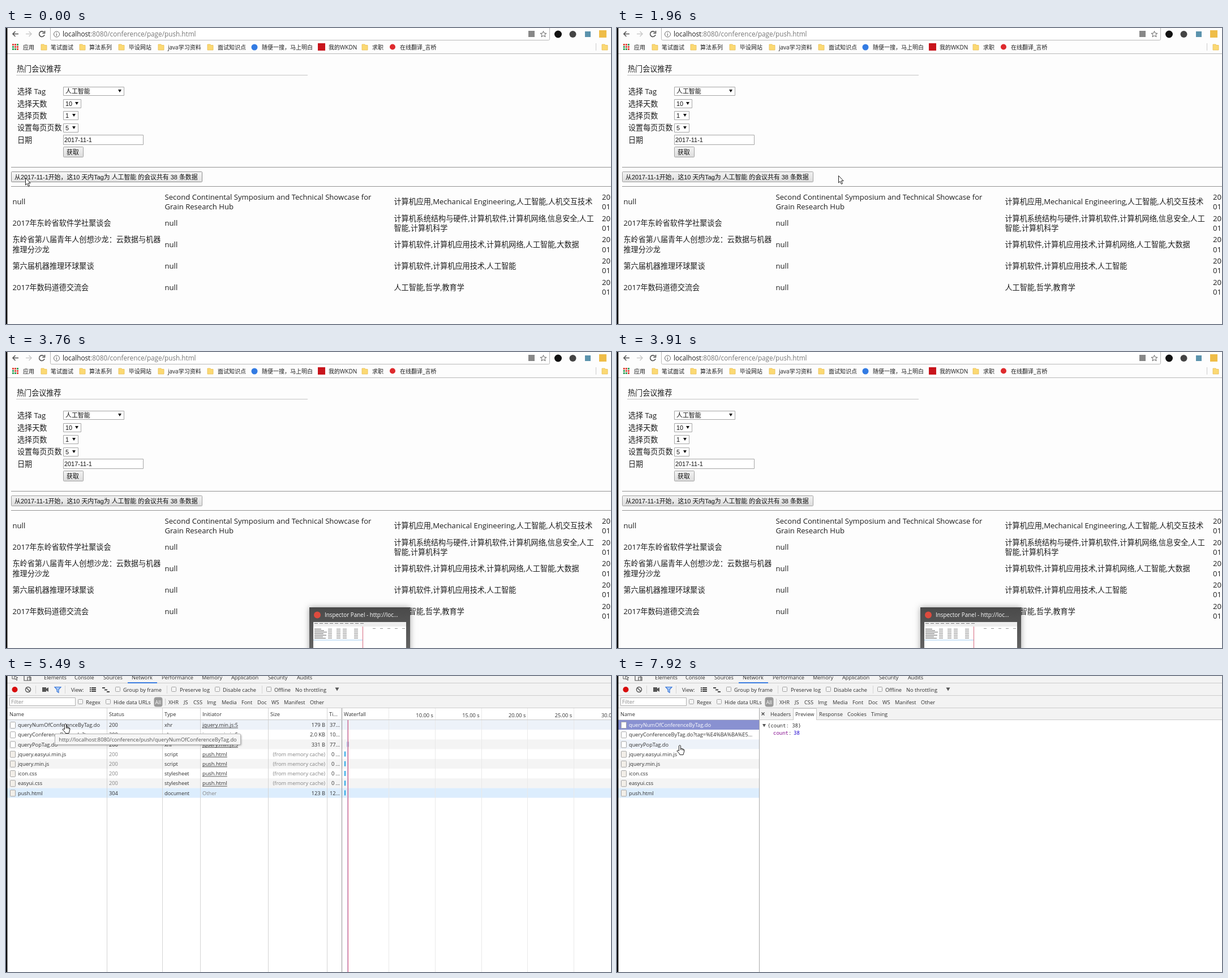
Animation of 1069 by 524 pixels, one loop 8000 ms. Source, as an HTML page with a canvas:

```html
<!DOCTYPE html>
<html lang="zh-CN">
<head>
<meta charset="utf-8">
<title>Conference page and network panel</title>
<style>
html, body { margin: 0; width: 100%; height: 100%; overflow: hidden; background: #fff; }
canvas { display: block; }
</style>
</head>
<body>
<canvas id="stage" width="1069" height="524"></canvas>
<script>
const W = 1069, H = 524, LOOP = 8000;
const g = document.getElementById('stage').getContext('2d');
const UI = '"Open Sans", "Noto Sans CJK SC", "Noto Sans CJK JP", sans-serif';
const FORM = '"Liberation Sans", "Noto Sans CJK SC", "Noto Sans CJK JP", sans-serif';
const MONO = '"Noto Sans Mono", monospace';
const SMALL = 9.25;
const PUSH_URL = 'http://localhost:8080/conference/push/';
const TAG_QUERY = '%E4%BA%BA%E5%B7%A5%E6%99%BA%E8%83%BD';

// ---- drawing helpers ----
function text(s, x, y, size = 13.1, color = '#1c1c1c', family = UI, align = 'left') {
  g.font = `${size}px ${family}`;
  g.fillStyle = color;
  g.textAlign = align;
  g.fillText(s, x, y);
}
const small = (s, x, y, color = '#303030', align) => text(s, x, y, SMALL, color, UI, align);

function rect(x, y, w, h, fill) {
  g.fillStyle = fill;
  g.fillRect(x, y, w, h);
}
function box(x, y, w, h, fill, stroke, radius = 0) {
  g.beginPath();
  g.roundRect(x + .5, y + .5, w - 1, h - 1, radius);
  paint(fill, stroke);
}
function circle(x, y, r, fill, stroke, width) {
  g.beginPath();
  g.arc(x, y, r, 0, 7);
  paint(fill, stroke, width);
}
function shape(d, x, y, fill, stroke, width) {
  g.save();
  g.translate(x, y);
  const path = new Path2D(d);
  if (fill) { g.fillStyle = fill; g.fill(path); }
  if (stroke) { g.strokeStyle = stroke; g.lineWidth = width || 1; g.stroke(path); }
  g.restore();
}
function paint(fill, stroke, width = 1) {
  if (fill) { g.fillStyle = fill; g.fill(); }
  if (stroke) { g.strokeStyle = stroke; g.lineWidth = width; g.stroke(); }
}
function gradient(y, h, top, bottom) {
  const fill = g.createLinearGradient(0, y, 0, y + h);
  fill.addColorStop(0, top);
  fill.addColorStop(1, bottom);
  return fill;
}

// ---- web page ----
function folder(x) {
  shape('M0 1H5L6 2.5H10V11H0Z', x, 28, '#fbd973', '#e9bd51', .8);
}
function select(x, y, w, h, value) {
  box(x, y, w, h, '#fff', '#a6a6a6');
  text(value, x + 4, y + h / 2 + 4, 10.9, '#111', FORM);
  shape('M0 0H6L3 5Z', x + w - 11, y + h / 2 - 3, '#111');
}
function button(x, y, w, h, label, hover) {
  box(x, y, w, h, gradient(y, h, hover ? '#f8f8f8' : '#f3f3f3', hover ? '#e2e2e2' : '#dcdcdc'),
    hover ? '#8c8c8c' : '#a0a0a0', 1);
  text(label, x + 6, y + h / 2 + 4, 10.9, '#111', FORM);
}
function lines(list, x, center) {
  list.forEach((s, i) => text(s, x, center + 4.8 + (i - (list.length - 1) / 2) * 17.2));
}

const bookmarks = [['笔试面试', 79], ['算法系列', 147], ['毕设网站', 217], ['java学习资料', 286], ['面试知识点', 374],
  ['随便一搜，马上明白', 452], ['我的WKDN', 570], ['求职', 647], ['在线翻译_言桥', 696]];
const conferences = [
  [['null'], ['Second Continental Symposium and Technical Showcase for', 'Grain Research Hub'],
    ['计算机应用,Mechanical Engineering,人工智能,人机交互技术']],
  [['2017年东岭省软件学社聚谈会'], ['null'], ['计算机系统结构与硬件,计算机软件,计算机网络,信息安全,人工', '智能,计算机科学']],
  [['东岭省第八届青年人创想沙龙：云数据与机器', '推理分沙龙'], ['null'], ['计算机软件,计算机应用技术,计算机网络,人工智能,大数据']],
  [['第六届机器推理环球聚谈'], ['null'], ['计算机软件,计算机应用技术,人工智能']],
  [['2017年数码道德交流会'], ['null'], ['人工智能,哲学,教育学']]
];

function drawBrowserBar() {
  shape('M11 5.5H1M5.5 1L1 5.5L5.5 10', 11, 5, null, '#555', 1.6);
  shape('M0 5.5H10M5.5 1L10 5.5L5.5 10', 35, 5, null, '#ccc', 1.6);
  shape('M9 2.5A4.8 4.8 0 1 0 10 7M10.5 0V4.2H6.3', 58, 5, null, '#555', 1.6);
  box(78, -4, 883, 26, '#fff', '#b8b8b8', 2);
  circle(89.5, 11, 5, null, '#666');
  rect(89, 10, 1, 4, '#666');
  rect(89, 8, 1, 1, '#666');
  text('localhost', 100, 15, 11.75, '#222');
  text(':8080/conference/page/push.html', 100 + g.measureText('localhost').width, 15, 11.75, '#777');
  rect(923, 5, 11, 11, '#888');
  shape('M0 -5.5L1.6 -1.8L5.5 -1.6L2.4 .9L3.5 4.8L0 2.6L-3.5 4.8L-2.4 .9L-5.5 -1.6L-1.6 -1.8Z', 949.5, 11, null, '#666');
  circle(975.5, 11, 6.5, '#111');
  circle(1001.5, 11, 6, '#444');
  rect(1023, 6, 10, 10, '#5b93ad');
  rect(1048, 4, 13, 13, '#efbd48');

  const dots = ['#e0483e', '#3e83e8', '#33a05a', '#eeb52d'];
  for (let i = 0; i < 9; i++) rect(11 + i % 3 * 4, 28 + Math.floor(i / 3) * 4, 3, 3, dots[(i * 3 + i % 2) % 4]);
  text('应用', 30, 37.5, 10);
  [62, 130, 199, 269, 356, 629, 1053].forEach(folder);
  bookmarks.forEach(([s, x]) => text(s, x, 37.5, 10));
  circle(439, 34, 5.5, '#327be3');
  rect(551, 27, 13, 13, '#c8141c');
  circle(683, 33.5, 5, '#de2a2d');
  rect(1042, 27, 1, 13, '#ccc');
  rect(0, 45, W, 1, '#b9b9b9');
}

function drawPage(pointer) {
  rect(0, 0, W, H, '#fdfdfd');
  drawBrowserBar();
  text('热门会议推荐', 19, 77);
  rect(18, 83, 515, 1, '#c4c4c4');
  ['选择 Tag', '选择天数', '选择页数', '设置每页页数', '日期'].forEach((s, i) => text(s, 20, 117.3 + i * 21.3));
  select(101, 104, 108, 16, '人工智能');
  select(101, 126, 32, 16, '10');
  select(101, 147, 27, 16, '1');
  select(101, 169, 27, 16, '5');
  box(101, 189, 142, 18, '#fff', '#a6a6a6');
  text('2017-11-1', 103, 202, 10.9, '#111', FORM);
  button(101, 210, 36, 19, '获取');
  const hover = pointer && pointer[0] < 347 && pointer[1] > 254 && pointer[1] < 273;
  button(9, 254, 338, 19, '从2017-11-1开始，这10 天内Tag为 人工智能 的会议共有 38 条数据', hover);
  [246, 280].forEach(y => rect(9, y, W, 1, '#929292'));
  conferences.forEach((cells, i) => {
    const center = 307.5 + i * 37.8;
    cells.forEach((cell, c) => lines(cell, [11.5, 280.5, 685.5][c], center));
    lines(['20', '01'], 1053, center);
  });
}

function drawThumbnail() {
  g.save();
  g.shadowColor = 'rgba(0,0,0,.35)';
  g.shadowBlur = 10;
  rect(536, 452, 178, 90, '#505050');
  g.restore();
  rect(536, 452, 178, 72, gradient(452, 72, '#4a4a4a', '#626262'));
  circle(550, 465.5, 6, '#dd4b3e');
  text('Inspector Panel - http://loc...', 563, 469, 9.9, '#fff');
  rect(543, 478, 164, 46, '#fff');
  rect(543, 478, 164, 8, '#ededed');
  for (let x = 545; x < 630; x += 9) rect(x, 480, 6, 1, '#777');
  for (let x = 648; x < 705; x += 13) rect(x, 489, 5, 1, '#999');
  for (let i = 0; i < 7; i++) {
    const y = 490 + i * 2.7;
    rect(545, y, 12 + i * 5 % 11, 1, '#666');
    [569, 584, 595, 615].forEach(x => rect(x, y, 7, 1, '#888'));
  }
  rect(543, 509, 87, 2, '#cfe5f8');
  rect(630, 486, 1, 38, '#d66a80');
}

// ---- network panel ----
const requests = [
  ['queryNumOfConferenceByTag.do', '200', 'xhr', 'jquery.min.js:5', '179 B', '37...'],
  ['queryConferenceByTag.do?tag=', '200', 'xhr', 'jquery.min.js:5', '2.0 KB', '10...'],
  ['queryPopTag.do', '200', 'xhr', 'jquery.min.js:5', '331 B', '77...'],
  ...[['jquery.easyui.min.js', 'script'], ['jquery.min.js', 'script'], ['icon.css', 'stylesheet'], ['easyui.css', 'stylesheet']]
    .map(([name, type]) => [name, '200', type, 'push.html', '(from memory cache)', '0 ...']),
  ['push.html', '304', 'document', 'Other', '123 B', '12...']
];
const ROW = 17.2, ROWS_TOP = 78;

function labels(list, y) {
  list.forEach(([s, x]) => small(s, x, y));
}
function checkbox(x, y) {
  box(x, y, 9, 9, '#f4f4f4', '#a2a2a2', 1);
}

function drawToolbars() {
  rect(0, 0, W, 56, '#f3f3f3');
  [12, 34, 56].forEach(y => rect(0, y, W, 1, '#cccccc'));
  shape('M8 0H0V6H3M4 1L10 4L7 5L9 8L7.5 8.5L6 6L4 7Z', 11, -1, null, '#555');
  shape('M0 -3V8H10V-3M6 8V2H12V8Z', 32, 0, null, '#555', 1.2);
  labels([['Elements', 67], ['Console', 121], ['Sources', 172], ['Network', 222], ['Performance', 275],
    ['Memory', 346], ['Application', 398], ['Security', 463], ['Audits', 514]], 6);
  rect(215, 11, 52, 2, '#3b7de0');

  circle(15.5, 24, 5, '#d80c0c');
  circle(39, 24, 4.5, null, '#555', 1.5);
  shape('M-3 -3L3 3', 39, 24, null, '#555', 1.5);
  [52, 104, 284, 452].forEach(x => rect(x, 17, 1, 14, '#d5d5d5'));
  shape('M0 0H7V2.5L11 0V8L7 5.5V8H0Z', 64, 20, '#555');
  shape('M0 0H11L7 4.5V10L4 8V4.5Z', 86, 19.5, '#a9c9f6', '#3b78d8', 1.2);
  small('View:', 115, 27.5);
  for (let i = 0; i < 3; i++) {
    rect(148, 20 + i * 3, 2, 2, '#444');
    rect(151, 20 + i * 3, 8, 2, '#444');
    rect(170 + i * 4, 20 + i * 3.5, 5, 2, '#444');
  }
  [193, 292, 369, 460].forEach(x => checkbox(x, 19));
  labels([['Group by frame', 207], ['Preserve log', 307], ['Disable cache', 383], ['Offline', 474], ['No throttling', 511]], 27.5);
  shape('M0 0H7L3.5 6Z', 581.5, 20.5, '#555');

  box(6, 38, 117, 15, '#fff', '#b0b0b0');
  small('Filter', 9, 49, '#888');
  [127, 176].forEach(x => checkbox(x, 41));
  labels([['Regex', 141], ['Hide data URLs', 190], ['XHR', 287], ['JS', 314], ['CSS', 331], ['Img', 355], ['Media', 381],
    ['Font', 416], ['Doc', 444], ['WS', 469], ['Manifest', 491], ['Other', 537]], 49.5);
  box(261, 37, 16, 18, '#9a9a9a', null, 4);
  small('All', 263.5, 49.5, '#fff');
  rect(281, 40, 1, 12, '#ccc');
}

function drawRows(width, split, hoverRow) {
  requests.forEach(([name, status, type, initiator, size, time], i) => {
    const y = ROWS_TOP + i * ROW, base = y + 12.2, selected = split && i === 0;
    const fill = selected ? '#8991d1' : i === 7 ? '#dcedfd' : i === hoverRow ? '#edf2f9' : i % 2 ? '#fff' : '#f4f4f4';
    rect(0, y, width, ROW, fill);
    box(7, y + 3, 10, 12, i > 2 ? '#f2eee8' : '#fff', '#a5a5a5', 1);
    const tail = i !== 1 ? '' : split ? '%E4%BA%BA%E5...' : '...';
    small(name + tail, 21, base, selected ? '#fff' : '#303030');
    if (split) return;
    const cached = i > 2 && i < 7, grey = '#858585';
    small(status, 182, base, cached ? grey : '#303030');
    small(type, 280, base);
    small(initiator, 347, base, i === 7 ? grey : '#303030');
    if (i < 7) rect(347, base + 1.3, g.measureText(initiator).width, .8, '#333');
    small(size, 564, base, cached ? grey : '#303030', 'right');
    small(time, 590, base, '#303030', 'right');
    if (i > 2) rect(598, y + 4, 2, 9, '#27a5e5');
    if (i === 2) rect(602.5, y + 4, 3, 9, '#5579c4');
  });
}

function drawTable(hoverRow) {
  drawRows(W, false, hoverRow);
  labels([['Name', 6], ['Status', 182], ['Type', 280], ['Initiator', 347], ['Size', 467], ['Ti...', 571], ['Waterfall', 597]], 70.5);
  [178, 276, 343, 463, 567].forEach(x => rect(x, 57, 1, H, '#d4d4d4'));
  rect(593, 57, 1, H, '#929292');
  for (let i = 0; i < 5; i++) {
    const x = 676 + i * 81.8;
    rect(Math.round(x), 57, 1, H, '#e9e9e9');
    if (i) small(`${(i + 1) * 5}.00 s`, x - 3, 73, '#303030', 'right');
  }
  small('30.00 s', 1052, 73);
  rect(603, 78, 1, H, '#c9b4dc');
  rect(604, 78, 1, H, '#dd6581');
}

function drawSplit(hoverRow, loaded) {
  drawRows(251, true, hoverRow);
  small('Name', 6, 70.5);
  rect(252, 57, W, 20, '#f3f3f3');
  rect(251, 57, 1, H, '#a9a9a9');
  box(311, 57, 42, 21, '#fff', '#c8c8c8');
  shape('M0 0L5 5M5 0L0 5', 255.5, 64.5, null, '#444', 1.2);
  labels([['Headers', 271], ['Preview', 315], ['Response', 357], ['Cookies', 407], ['Timing', 449]], 71.3);
  if (!loaded) return;
  shape('M0 0H6L3 5.5Z', 257, 85, '#555');
  text('{count: 38}', 266, 91, 9, '#333', MONO);
  text('count', 276, 104, 9, '#881391', MONO);
  text(':', 303, 104, 9, '#333', MONO);
  text('38', 312, 104, 9, '#1c00cf', MONO);
}

function drawPanel(t) {
  const split = t >= 6650;
  const past = cursorAt(t - 130);   // row highlight trails the pointer
  const hoverRow = past && !(split && past[0] > 251) ? Math.floor((past[1] - ROWS_TOP) / ROW) : -1;
  rect(0, 0, W, H, '#fff');
  drawToolbars();
  if (split) drawSplit(hoverRow, t >= 6800);
  else drawTable(hoverRow);
  rect(0, 77, W, 1, '#c9c9c9');
  if (split) rect(312, 77, 40, 1, '#fff');
}

// ---- tooltips: start, end, x, y, opacity, request ----
const tooltips = [
  [4680, 4830, 49, 135, 1, 'queryPopTag.do'],
  [4830, 4962, 49, 135, .3, 'queryPopTag.do'],
  [4962, 5358, 39, 125, 1, `queryConferenceByTag.do?tag=${TAG_QUERY}&date=2017-11-1&dayNum=10&pageNum=1&pageSize=5`],
  [5490, 6800, 86, 102, 1, 'queryNumOfConferenceByTag.do']
];
function drawTooltip(t) {
  const tip = tooltips.find(([start, end]) => t >= start && t < end);
  if (!tip) return;
  const [, , x, y, opacity, request] = tip, label = PUSH_URL + request;
  g.save();
  g.globalAlpha = opacity;
  g.font = `${SMALL}px ${UI}`;
  const width = Math.round(g.measureText(label).width) + 15;
  g.save();
  g.shadowColor = 'rgba(0,0,0,.3)';
  g.shadowBlur = 3;
  g.shadowOffsetX = g.shadowOffsetY = 1.5;
  box(x, y, width, 20, '#f6f6f6', null, 2);
  g.restore();
  box(x, y, width, 20, null, '#b2b2b2', 2);
  small(label, x + 7.5, y + 13.5, '#505050');
  g.restore();
}

// ---- pointer: stepped moves as start, end, steps, waypoints ----
const moves = [
  [0, 0, 1, [[34, 265]]],
  [120, 540, 4, [[30, 265], [20, 265]]],
  [820, 1810, 8, [[45, 265], [379, 262]]],
  [1960, 2650, 6, [[391, 261], [520, 300], [650, 318], [717, 319], [650, 270], [577, 237]]],
  [2930, 3065, 2, [[590, 330], [610, 451]]],
  [3200, 3200, 1, null],
  [3944, 4680, 5, [[632, 500], [628, 490], [628, 490], [420, 330], [67, 119]]],
  [4830, 5490, 6, [[57, 107], [57, 107], [58, 106], [75, 97], [98, 88], [105, 84]]],
  [7080, 7920, 7, [[180, 95], [358, 112], [330, 116], [111, 122]]]
];
function cursorAt(t) {
  const [start, end, steps, points] = moves.findLast(m => t >= m[0]) || moves[0];
  if (!points) return null;
  const last = steps - 1;
  const step = last ? Math.min(last, Math.floor((t - start) / (end - start) * last + 1e-6)) : 0;
  const at = last ? step / last * (points.length - 1) : 0;
  const i = Math.floor(at), a = points[i], b = points[i + 1] || a;
  return a.map((v, axis) => Math.round(v + (b[axis] - v) * (at - i)));
}
function drawCursor([x, y], hand) {
  if (hand) {
    shape('M-1.5 1.5Q0 -.5 1.5 1.5V6L6.5 7.5Q8 8 8 10L7 14L6 17.5H0L-1 15L-5 11Q-4.5 8.5 -1.5 10.5ZM1.5 6V9M4 7V9.5M6.3 7.8V10',
      x, y, '#fff', '#222', 1);
  } else {
    shape('M.5 .5V13L3.3 10.4L5.4 15.3L7.5 14.4L5.4 9.6H9.2Z', x, y, '#fff', '#222', 1);
  }
}

function render(t) {
  const pointer = cursorAt(t);
  if (t < 4312) drawPage(pointer);
  if (t >= 4128) {
    g.globalAlpha = t < 4312 ? .5 : 1;
    drawPanel(t);
    g.globalAlpha = 1;
  }
  if (t >= 3760 && t < 4496) drawThumbnail();
  rect(0, 0, 2.4, H, '#000');
  drawTooltip(t);
  if (pointer) drawCursor(pointer, t >= 4680 && pointer[0] < 251);
}
function frame() {
  render(performance.now() % LOOP);
  requestAnimationFrame(frame);
}
frame();
</script>
</body>
</html>
```
